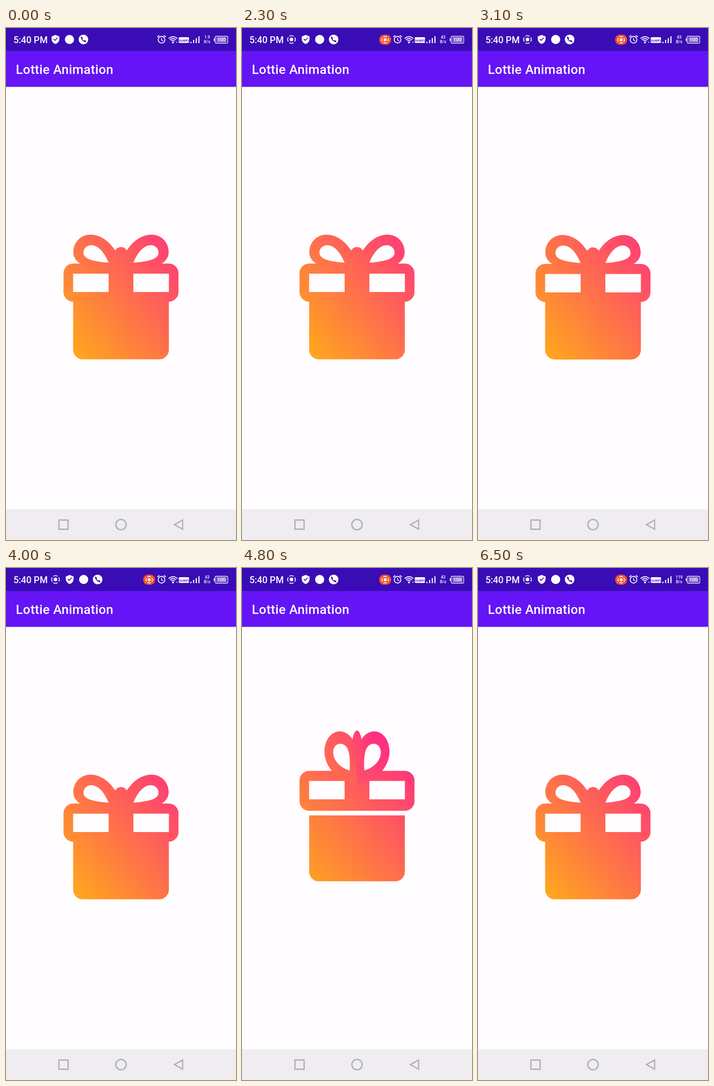
Animation, 502 px wide and 1115 px high, one loop 6700 ms. Source, as an HTML page with a canvas:

```html
<!DOCTYPE html>
<html lang="en">
<head>
<meta charset="utf-8">
<title>Gift animation</title>
<style>
html, body { margin: 0; width: 100%; height: 100%; overflow: hidden; background: #fffdff; }
canvas { display: block; }
</style>
</head>
<body>
<canvas id="stage" width="502" height="1115"></canvas>
<script>
const ctx = document.getElementById('stage').getContext('2d');
const LOOP = 6700, CYCLE = 2300, CYCLE_OFFSET = 600;
const CX = 251, CY = 588, JUMP = 71;
const PURPLE = '#3a0cb6', WHITE = '#fff', GREY = '#b1afb2', PAGE = '#fffdff';
const lerp = (a, b, u) => a + (b - a) * u;
const clamp = u => Math.max(0, Math.min(1, u));

// Height of the hop: 1 is fully up, below 0 is squashed
function hop(phase) {
  const air = 1 - ((phase - 855) / 215) ** 2;
  if (air > 0) return 1.07 * air;
  if (phase < 855) return 0;
  const s = (phase - 1070) / 150;
  return -.15 * Math.sin(Math.PI * s) * Math.exp(-s);
}

// Left petal, relative to the middle of the lid's top edge
const REST = {
  loop: { start: [-13, -29], top: [-67, -63], side: [-104, -25], tip: [0, 20] },
  hole: { start: [-27, -2], top: [-65, -40], side: [-82, -24], tip: [-27, -2] }
};
const RAISED = {
  loop: { start: [-9, -68], top: [-38, -86], side: [-71, -42], tip: [-4, 31] },
  hole: { start: [-16, -1], top: [-37, -59], side: [-52, -41], tip: [-16, -1] }
};

function petal(part, side, lidTop, lift, pinch) {
  const at = name => REST[part][name].map((v, i) => lerp(v, RAISED[part][name][i], lift));
  const between = (a, b, u, v) => [lerp(a[0], b[0], u), lerp(a[1], b[1], v)];
  const place = ([x, y]) => [CX + side * x, lidTop + y];
  const start = at('start'), top = at('top'), edge = at('side'), tip = at('tip');
  const bezier = (...points) => ctx.bezierCurveTo(...points.flatMap(place));
  ctx.moveTo(...place(start));
  bezier(between(start, top, .25 - .35 * pinch, .6), between(top, start, .4 + .5 * pinch, 0), top);
  bezier(between(top, edge, .56, 0), between(edge, top, 0, .56), edge);
  bezier(between(edge, tip, 0, .48), between(edge, tip, .2 + .25 * lift, .87), tip);
  ctx.lineTo(...place([-side * 0 + 1, tip[1] - 4]).map((v, i) => part === 'loop' ? v : place(tip)[i]));
  if (part === 'loop') ctx.lineTo(...place([1, start[1]]));
  ctx.closePath();
}

function giftGradient(shift = 0) {
  const g = ctx.createLinearGradient(147 + shift, 715, 428 + shift, 481);
  g.addColorStop(0, '#ffa81c');
  g.addColorStop(1, '#ff2f82');
  return g;
}

function drawBow(lidTop, lift) {
  for (const side of [-1, 1]) {
    ctx.fillStyle = giftGradient(-side * -33 * lift * -1);
    ctx.beginPath();
    petal('loop', -side, lidTop, lift, 0);
    petal('hole', -side, lidTop, lift, lift);
    ctx.fill('evenodd');
  }
  const rx = 14 - 3 * lift, ry = 14 + 22 * lift ** 3;
  ctx.fillStyle = giftGradient();
  ctx.beginPath();
  ctx.ellipse(CX, lidTop - 36 - 52 * lift ** 1.7 + ry, rx, ry, 0, 0, 7);
  ctx.fill();
}

function drawBurst(phase) {
  if (phase < 1100 || phase > 1390) return;
  const reach = 231 * (1 - (1 - clamp((phase - 1080) / 140)) ** 3);
  const r = 17 * (1 - clamp((phase - 1290) / 100));
  for (let i = 0; i < 6; i++) {
    const a = (i + .5) * Math.PI / 3;
    disc(CX + .5 + reach * Math.cos(a), CY + reach * Math.sin(a), r);
  }
}

function drawGift(phase) {
  const height = hop(phase);
  const rise = JUMP * height;
  const lift = clamp(height) ** .65;
  const bottom = 721.5 - .55 * rise, boxTop = 590 - .72 * rise;
  const lidTop = 513 - rise, windowTop = 535 - rise;
  ctx.fillStyle = giftGradient();
  drawBurst(phase);
  ctx.beginPath();
  ctx.roundRect(146.5, boxTop, 209, bottom - boxTop, [0, 0, 21, 21]);
  ctx.fill();
  ctx.beginPath();
  ctx.roundRect(125.5, lidTop, 251, 83 + 4 * height, 21);
  ctx.rect(146.5, windowTop, 77.5, 40);
  ctx.rect(278, windowTop, 77.5, 40);
  ctx.fill('evenodd');
  drawBow(lidTop, lift);
}

function box(x, y, w, h, color) {
  ctx.fillStyle = color;
  ctx.fillRect(x, y, w, h);
}

function pill(x, y, w, h, r, color) {
  ctx.fillStyle = color;
  ctx.beginPath();
  ctx.roundRect(x, y, w, h, r);
  ctx.fill();
}

function disc(x, y, r, color) {
  if (color) ctx.fillStyle = color;
  ctx.beginPath();
  ctx.arc(x, y, r, 0, 7);
  ctx.fill();
}

function arc(x, y, r, width, color, from = 0, to = 2 * Math.PI) {
  ctx.strokeStyle = color;
  ctx.lineWidth = width;
  ctx.beginPath();
  ctx.arc(x, y, r, from, to);
  ctx.stroke();
}

function line(points, width, color, close) {
  ctx.strokeStyle = color;
  ctx.lineWidth = width;
  ctx.beginPath();
  points.forEach(([x, y]) => ctx.lineTo(x, y));
  if (close) ctx.closePath();
  ctx.stroke();
}

function text(s, x, y, size, { align = 'left', color = WHITE, spacing = 0 } = {}) {
  ctx.font = `500 ${size}px Roboto, sans-serif`;
  ctx.letterSpacing = spacing + 'px';
  ctx.textAlign = align;
  ctx.fillStyle = color;
  ctx.fillText(s, x, y);
}

function recordIcon(x, y, r) {
  disc(x, y, r * .48, WHITE);
  for (let i = 0; i < 4; i++) {
    const a = (i + .5) * Math.PI / 2 + .2;
    arc(x, y, r, 1.8, WHITE, a, a + Math.PI / 2 - .4);
  }
}

function shieldIcon(x, y) {
  ctx.fillStyle = WHITE;
  ctx.beginPath();
  ctx.moveTo(x, y - 10);
  ctx.lineTo(x + 8.5, y - 6.5);
  ctx.lineTo(x + 8.5, y - 1);
  ctx.quadraticCurveTo(x + 8, y + 7, x, y + 10);
  ctx.quadraticCurveTo(x - 8, y + 7, x - 8.5, y - 1);
  ctx.lineTo(x - 8.5, y - 6.5);
  ctx.fill();
  line([[x - 4, y - 1], [x - 1, y + 2], [x + 4.5, y - 4]], 1.8, PURPLE);
}

function phoneIcon(x, y) {
  disc(x, y, 10.5, WHITE);
  ctx.lineCap = 'round';
  ctx.strokeStyle = PURPLE;
  ctx.lineWidth = 2;
  ctx.beginPath();
  ctx.moveTo(x - 4.5, y - 4.5);
  ctx.quadraticCurveTo(x - 3.5, y + 3.5, x + 4.5, y + 4.5);
  ctx.stroke();
  line([[x - 4.3, y - 4.5], [x - 3, y - 2.5]], 3.2, PURPLE);
  line([[x + 4.5, y + 4.3], [x + 2.5, y + 3]], 3.2, PURPLE);
  ctx.lineCap = 'butt';
}

function alarmIcon(x, y) {
  arc(x, y + .5, 7.3, 1.9, WHITE);
  line([[x, y - 3.5], [x, y + 1], [x + 3.5, y + 3]], 1.6, WHITE);
  for (const s of [-1, 1]) line([[x + s * 5, y - 9], [x + s * 9.3, y - 5.3]], 2, WHITE);
}

function wifiIcon(x, y) {
  for (let r = 5; r < 14; r += 4) arc(x, y, r, 2, WHITE, -Math.PI * .76, -Math.PI * .24);
  disc(x, y - .5, 2, WHITE);
  box(x + 7.5, y - 2, 2, 2, WHITE);
}

function batteryIcon(x, y) {
  ctx.strokeStyle = WHITE;
  ctx.lineWidth = 1.3;
  ctx.beginPath();
  ctx.roundRect(x, y, 27.5, 15, 2.5);
  ctx.stroke();
  box(x - 3, y + 4.5, 2, 6, WHITE);
  pill(x + 2.5, y + 2, 22.5, 11, 1, '#8d70d6');
  text('100', x + 13.8, y + 11.3, 10.5, { align: 'center' });
}

function drawStatus(t) {
  const recording = t >= 100;
  box(0, 0, 502, 50, PURPLE);
  text('5:40 PM', 16.2, 33, 20);
  if (recording) {
    recordIcon(108, 25, 8.3);
    pill(299.5, 14.5, 26, 22, 10, '#f0512f');
    recordIcon(312.5, 25.5, 7);
  }
  const x = recording ? 139 : 108;
  shieldIcon(x, 25);
  disc(x + 30.5, 25, 10, WHITE);
  phoneIcon(x + 61, 25);
  alarmIcon(339.5, 25);
  wifiIcon(364.5, 32);
  pill(377, 20, 22.5, 12.5, 2, WHITE);
  text('VoWiFi', 388.2, 29.5, 7, { align: 'center', color: PURPLE });
  for (let i = 0; i < 4; i++) box(402.5 + i * 5.8, 30 - i * 4, 2.4, 3 + i * 4, WHITE);
  const [speed, unit] = t < 800 ? ['1.9', 'K/s'] : [t < 5900 ? '43' : '119', 'B/s'];
  text(speed, 439, 23, 9, { align: 'center' });
  text(unit, 439, 33, 9, { align: 'center' });
  batteryIcon(456.5, 18);
}

function drawToolbar() {
  box(0, 50, 502, 78, '#6414f5');
  const shade = ctx.createLinearGradient(0, 128, 0, 131);
  shade.addColorStop(0, '#dedae2');
  shade.addColorStop(1, PAGE);
  box(0, 128, 502, 3, shade);
  text('Lottie Animation', 21.6, 100, 28, { spacing: .35 });
}

function drawNavigation() {
  box(0, 1048, 502, 67, '#efedf0');
  ctx.strokeStyle = GREY;
  ctx.lineWidth = 2.8;
  ctx.strokeRect(115.5, 1071.5, 20, 20);
  arc(CX, 1081.5, 11.3, 2.8, GREY);
  line([[367.5, 1081.5], [385.5, 1071.5], [385.5, 1091.5]], 2.6, GREY, true);
}

function render(now) {
  const t = now % LOOP;
  box(0, 0, 502, 1115, PAGE);
  drawGift((t + CYCLE_OFFSET) % CYCLE);
  drawStatus(t);
  drawToolbar();
  drawNavigation();
}

const start = performance.now();
function tick() {
  render(performance.now() - start);
  requestAnimationFrame(tick);
}
tick();
</script>
</body>
</html>
```
